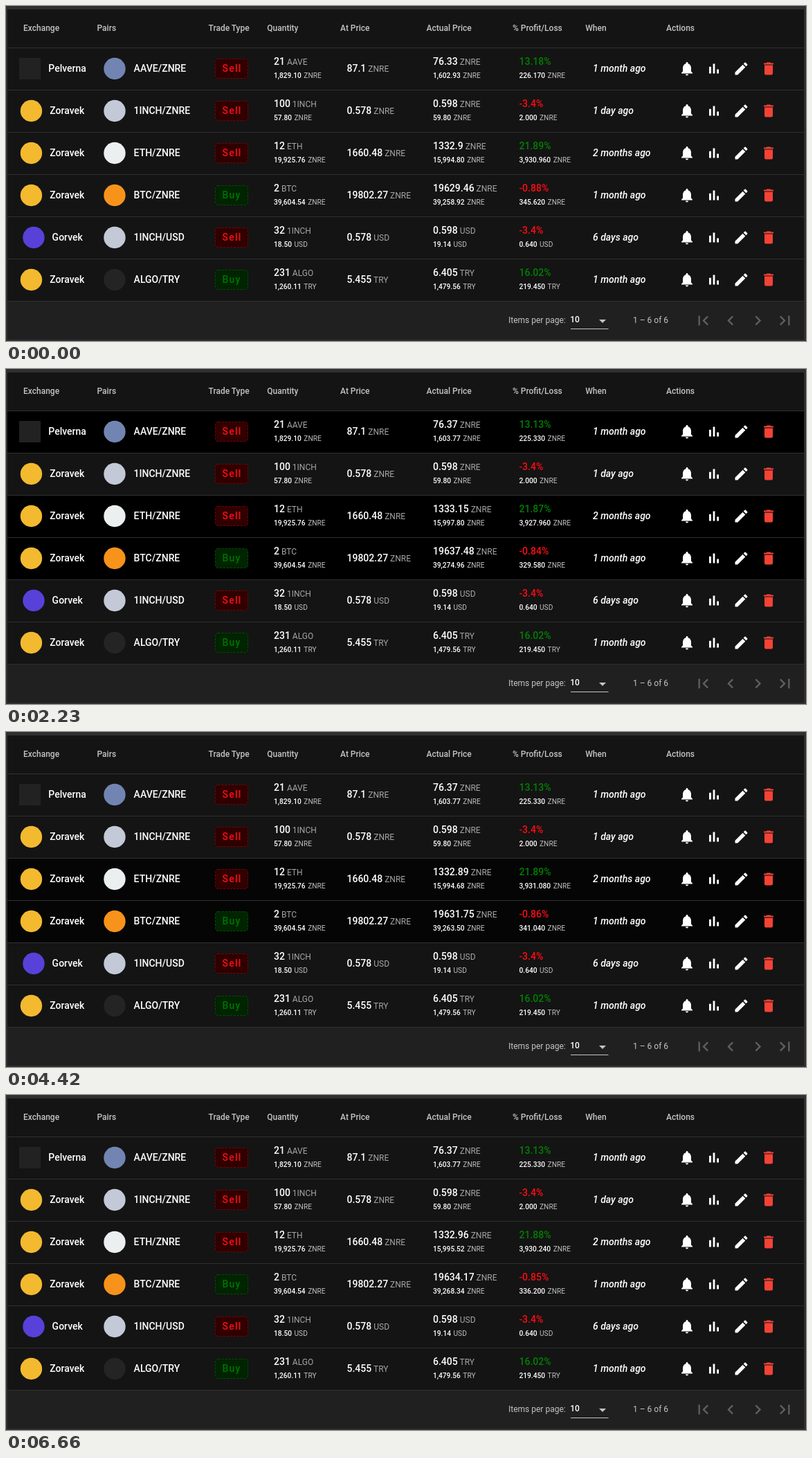
Write an HTML page that moves like this. It is 1156 by 484 pixels and loops after 8000 ms.

```html
<!DOCTYPE html>
<html lang="en">
<head>
<meta charset="utf-8">
<title>Trades</title>
<style>
html, body { margin: 0; width: 100%; height: 100%; overflow: hidden; background: #303030; }
svg { display: block; font: 500 14px Roboto, sans-serif; fill: #fff; }
.head { font-size: 12px; fill: #c4c4c4; }
.foot { font-size: 12px; font-weight: 400; fill: #c4c4c4; }
.size { font-size: 12px; }
.unit { font-size: 12px; font-weight: 400; fill: #a5a5a5; }
.small { font-size: 10.2px; }
.small.unit { fill: #c0c0c0; }
.when { font-style: italic; }
.side { letter-spacing: 1.25px; }
.off { fill: #5f5f5f; }
</style>
</head>
<body>
<svg id="stage" width="1156" height="484" viewBox="0 0 1156 484"></svg>
<script>
const LOOP = 8000, STEP = 67.5, FADE_STEPS = 4;
const UPDATES = [170, 2230, 4290, 6380];
const COIN = 'ZNRE';

const HEADS = [[25, 'Exchange'], [131.5, 'Pairs'], [292.5, 'Trade Type'], [377.3, 'Quantity'],
  [483, 'At Price'], [607.5, 'Actual Price'], [732, '% Profit/Loss'], [837.3, 'When'], [954, 'Actions']];

const EXCHANGES = {
  Pelverna: { x: 61.3, mark: box(19, 75, 31, 31, '#222') },
  Zoravek: { x: 63.3, mark: dot(36.5, '#f3ba2f') },
  Gorvek: { x: 66.6, mark: dot(40, '#5741d9') }
};
const COLORS = { AAVE: '#7285b2', '1INCH': '#c3c9d6', ETH: '#ecefef', BTC: '#f7931a', ALGO: '#242424' };

// prices: one value, or one per state
const ROWS = [
  { exch: 'Pelverna', base: 'AAVE', quote: COIN, side: 'Sell', qty: 21, at: 87.1,
    prices: [76.33, 76.33, 76.37, 76.37, 76.37], when: '1 month ago' },
  { exch: 'Zoravek', base: '1INCH', quote: COIN, side: 'Sell', qty: 100, at: 0.578,
    prices: [0.598], when: '1 day ago' },
  { exch: 'Zoravek', base: 'ETH', quote: COIN, side: 'Sell', qty: 12, at: 1660.48,
    prices: [1332.9, 1333.26, 1333.15, 1332.89, 1332.96], when: '2 months ago' },
  { exch: 'Zoravek', base: 'BTC', quote: COIN, side: 'Buy', qty: 2, at: 19802.27,
    prices: [19629.46, 19638.81, 19637.48, 19631.75, 19634.17], when: '1 month ago' },
  { exch: 'Gorvek', base: '1INCH', quote: 'USD', side: 'Sell', qty: 32, at: 0.578,
    prices: [0.598], when: '6 days ago' },
  { exch: 'Zoravek', base: 'ALGO', quote: 'TRY', side: 'Buy', qty: 231, at: 5.455,
    prices: [6.405], when: '1 month ago' }
];

const SIDES = {
  Sell: { text: '#ff0c14', back: '#300000', edge: '#7c0008' },
  Buy: { text: '#007400', back: '#002400', edge: '#005000' }
};

const ACTIONS = [
  [972, '#fff', 'M12 22c1.1 0 2-.9 2-2h-4c0 1.1.89 2 2 2zm6-6v-5c0-3.07-1.64-5.64-4.5-6.32V4c0-.83-.67-1.5-1.5-1.5s-1.5.67-1.5 1.5v.68C7.63 5.36 6 7.92 6 11v5l-2 2v1h16v-1l-2-2z'],
  [1011, '#fff', 'M5 9.2h3V19H5zM10.6 5h2.8v14h-2.8zm5.6 8H19v6h-2.8z'],
  [1050.5, '#fff', 'M3 17.25V21h3.75L17.81 9.94l-3.75-3.75L3 17.25zM20.71 7.04c.39-.39.39-1.02 0-1.41l-2.34-2.34c-.39-.39-1.02-.39-1.41 0l-1.83 1.83 3.75 3.75 1.83-1.83z'],
  [1090, '#f44336', 'M6 19c0 1.1.9 2 2 2h8c1.1 0 2-.9 2-2V7H6v12zM19 4h-3.5l-1-1h-5l-1 1H5v2h14V4z']
];
const PAGERS = [
  [993.5, 'M18.41 16.59L13.82 12l4.59-4.59L17 6l-6 6 6 6zM6 6h2v12H6z'],
  [1033, 'M15.41 7.41L14 6l-6 6 6 6 1.41-1.41L10.83 12z'],
  [1072.5, 'M10 6L8.59 7.41 13.17 12l-4.58 4.59L10 18l6-6z'],
  [1111.5, 'M5.59 7.41L10.18 12l-4.59 4.59L7 18l6-6-6-6zM16 6h2v12h-2z']
];

function dot(x, color) { return `<circle cx="${x}" cy="90.5" r="15.7" fill="${color}"/>`; }

function text(x, y, str, cls = '', fill = '') {
  return `<text x="${x}" y="${y}" class="${cls}"${fill && ` fill="${fill}"`}>${str}</text>`;
}

function box(x, y, w, h, fill) {
  return `<rect x="${x}" y="${y}" width="${w}" height="${h}" fill="${fill}"/>`;
}

const span = (cls, str) => `<tspan class="${cls}">${str}</tspan>`;
const amount = (value, unit) => value + span('unit', ' ' + unit);
const total = (n, digits, unit) => span('small', money(n, digits)) + ' ' + span('small unit', unit);

function money(n, digits) {
  return (n + 1e-9).toLocaleString('en-US', { minimumFractionDigits: digits, maximumFractionDigits: digits });
}

const priceAt = (row, state) => row.prices[state] ?? row.prices[0];

function drawRow(row, i, state, shade) {
  const { base, quote, qty, at } = row;
  const price = priceAt(row, state);
  const changed = state > 0 && price !== priceAt(row, state - 1);
  const level = Math.round(20 * (changed ? shade : 1));
  const gain = row.side === 'Buy' ? price - at : at - price;
  const percent = +(gain / ((price + at) / 2) * 100).toFixed(2);
  const exch = EXCHANGES[row.exch], side = SIDES[row.side];
  return `<g transform="translate(0 ${i * 61})">` +
    box(2, 61, 1151, 60, `rgb(${level},${level},${level})`) +
    box(2, 121, 1151, 1, '#303030') +
    exch.mark + text(exch.x, 95, row.exch) +
    dot(157, COLORS[base]) + text(184.6, 95, `${base}/${quote}`) +
    `<rect x="302.5" y="76.5" width="47" height="28" rx="4" fill="${side.back}" stroke="${side.edge}" stroke-dasharray="3 2"/>` +
    text(312.5, 95, row.side, 'side', side.text) +
    text(387, 85, amount(qty, base)) +
    text(387, 104, total(qty * at, 2, quote)) +
    text(492.5, 95, amount(at, quote)) +
    text(617, 85, amount(price, quote)) +
    text(617, 104, total(qty * price, 2, quote)) +
    text(741.5, 85, percent + '%', '', gain < 0 ? '#ff0c14' : '#008000') +
    text(741.5, 104, total(Math.abs(gain) * qty, 3, quote)) +
    text(848, 95, row.when, 'when') +
    ACTIONS.map(([x, fill, d]) => `<path transform="translate(${x} 78.5)" fill="${fill}" d="${d}"/>`).join('') +
    '</g>';
}

const header = box(2, 5, 1151, 55, '#141414') + box(2, 60, 1151, 1, '#303030') +
  HEADS.map(([x, label]) => text(x, 36, label, 'head')).join('');

const footer = box(2, 427, 1151, 55, '#202020') +
  text(726, 458, 'Items per page:', 'foot') + text(815.3, 457, '10', 'size') +
  box(816, 466, 54.5, 1, '#c4c4c4') + '<path d="M857 453h10l-5 5z" fill="#c4c4c4"/>' +
  text(906, 458, '1 – 6 of 6', 'foot') +
  PAGERS.map(([x, d]) => `<path class="off" transform="translate(${x} 440.5) scale(1.1667)" d="${d}"/>`).join('');

const stage = document.getElementById('stage');
let shown;

function draw(now) {
  const t = now % LOOP;
  const state = UPDATES.filter(start => t >= start).length;
  const since = state ? t - UPDATES[state - 1] : LOOP;
  const shade = Math.min(1, Math.floor(since / STEP) / FADE_STEPS);
  const key = state + ':' + shade;
  if (key !== shown) {
    shown = key;
    stage.innerHTML = header + ROWS.map((row, i) => drawRow(row, i, state, shade)).join('') + footer;
  }
}

const begin = performance.now();
function tick() {
  draw(performance.now() - begin);
  requestAnimationFrame(tick);
}
tick();
</script>
</body>
</html>
```
